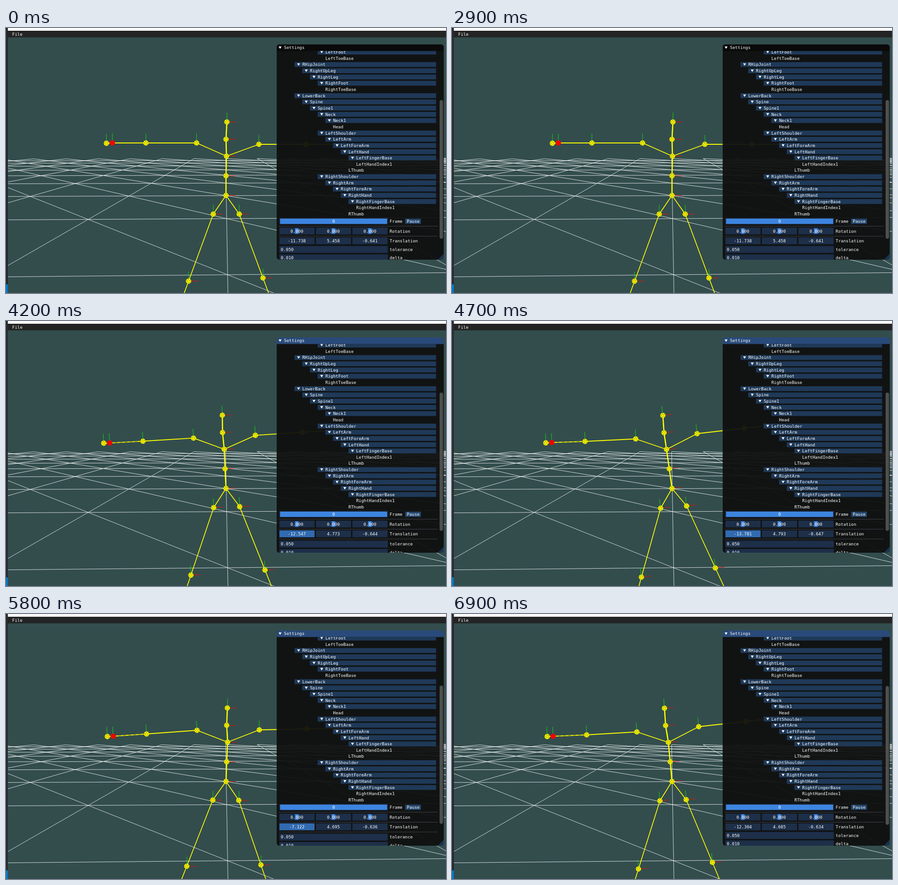
An HTML page with a canvas that plays this animation: 964x581 px, repeating every 7 s.

```html
<!DOCTYPE html>
<html lang="en">
<head>
<meta charset="utf-8">
<title>Skeleton viewer</title>
<style>
  html, body { margin: 0; width: 100%; height: 100%; overflow: hidden; background: #334d4d; }
  canvas, svg { position: absolute; left: 0; top: 0; width: 964px; height: 581px; display: block; }
  text { font: 9.35px "DejaVu Sans Mono", monospace; fill: #fff; white-space: pre; }
  .header { fill: #1f3958; }
  .frame { fill: #1d2f49; }
  .frame.hover { fill: #23456d; }
  .frame.active { fill: #316ab0; }
  .grab { fill: #3d85e0; }
  .rule { fill: #404048; }
  .mid { text-anchor: middle; }
</style>
</head>
<body>
<canvas id="scene" width="964" height="581"></canvas>
<svg id="ui" viewBox="0 0 964 581">
  <defs>
    <clipPath id="window"><rect x="593" y="36" width="366" height="472" rx="6"/></clipPath>
    <clipPath id="content"><rect x="593" y="50.5" width="366" height="457.5"/></clipPath>
  </defs>
</svg>
<script>
const LOOP = 7000, STEP = 100;
const ctx = document.getElementById('scene').getContext('2d');
const ui = document.getElementById('ui');

// ---------- interface ----------
function add(parent, tag, attrs, label) {
  const node = document.createElementNS('http://www.w3.org/2000/svg', tag);
  for (const key in attrs) node.setAttribute(key, attrs[key]);
  if (label !== undefined) node.textContent = label;
  parent.appendChild(node);
  return node;
}
const rect = (parent, x, y, width, height, attrs) =>
  add(parent, 'rect', { x, y, width, height, ...attrs });
const text = (parent, x, midY, label, cls = '') =>
  add(parent, 'text', { x, y: midY + 3.2, class: cls }, label);
const arrow = (parent, x, y) =>
  add(parent, 'path', { d: `M${x - 3.2} ${y - 2.6}h6.4l-3.2 5.4z`, fill: '#fff' });

rect(ui, 0, 0, 964, 6, { fill: '#fff' });
rect(ui, 0, 6, 964, 14.5, { fill: '#242424' });
text(ui, 13.5, 14, 'File');
rect(ui, 0, 0, 4, 581, { fill: '#29292c' });
const edge = rect(ui, 2, 0, 2, 581, { fill: '#252528' });
rect(ui, 0, 562, 4, 19, { fill: '#007acc' });

const win = add(ui, 'g', { 'clip-path': 'url(#window)' });
rect(win, 593, 36, 366, 472, { fill: '#0f0f0f', 'fill-opacity': .94 });
const title = rect(win, 593, 36, 366, 14.5, { fill: '#0a0a0a' });
arrow(win, 600.5, 43);
text(win, 609, 43.2, 'Settings');
const scroll = rect(win, 950, 158, 7.5, 304, { rx: 3.7, fill: '#4f4f4f' });
add(win, 'path', { d: 'M959 495v13h-13z', fill: '#1b3350' });

const body = add(win, 'g', { 'clip-path': 'url(#content)' });
// A leading digit is the depth; a trailing dot marks a leaf.
const TREE = `3LeftFoot 4LeftToeBase. 0RHipJoint 1RightUpLeg 2RightLeg 3RightFoot 4RightToeBase.
  0LowerBack 1Spine 2Spine1 3Neck 4Neck1 5Head. 3LeftShoulder 4LeftArm 5LeftForeArm 6LeftHand
  7LeftFingerBase 8LeftHandIndex1. 7LThumb. 3RightShoulder 4RightArm 5RightForeArm 6RightHand
  7RightFingerBase 8RightHandIndex1. 7RThumb.`;
TREE.split(/\s+/).forEach((entry, i) => {
  const x = 632.2 + entry[0] * 16.88, y = 52.7 + i * 13.65;
  const leaf = entry.endsWith('.'), name = entry.slice(1).replace('.', '');
  if (!leaf) {
    rect(body, x, y - 5.2, 942.3 - x, 10.6, { class: 'header' });
    arrow(body, x + 8.8, y);
  }
  text(body, leaf ? x : x + 17, y + .2, name);
});

const frames = {};
const frame = (id, parent, x, y, w, h) => frames[id] = rect(parent, x, y, w, h, { class: 'frame' });
const rule = (parent, y) => rect(parent, 597.5, y, 348, 1, { class: 'rule' });

frame('slider', body, 599, 416.5, 237.5, 14);
rect(body, 600.5, 418, 234.5, 11.5, { class: 'grab' });
text(body, 717.8, 424, '0', 'mid');
text(body, 840.5, 424, 'Frame');
rect(body, 874.5, 418, 34.5, 11.5, { fill: '#23456d' });
text(body, 878, 424, 'Pause');
rule(body, 434);
rule(body, 456);
text(body, 840.5, 445.5, 'Rotation');
text(body, 840.5, 467, 'Translation');
const readout = [0, 1, 2].map(i => {
  const x = 599 + i * 80, mid = x + 38.2;
  frame('rot' + i, body, x, 437.5, 77, 15.2);
  rect(body, mid - 4, 439, 8, 12.2, { class: 'grab' });
  text(body, mid, 445.5, '0.000', 'mid');
  frame('pos' + i, body, x, 459, 77, 15.2);
  return text(body, mid, 467, '', 'mid');
});
const extraRule = rule(body, 477.5);
const tail = add(body, 'g', {});
[['tolerance', '0.050'], ['delta', '0.010']].forEach(([name, value], i) => {
  const y = 485.5 + i * 18.5;
  frame(name, tail, 599, y - 7.6, 237.5, 15.2);
  text(tail, 602, y, value);
  text(tail, 840.5, y, name);
});

// ---------- motion ----------
// Joints: spine, chest, neck, head, left shoulder, elbow, wrist,
// right shoulder, elbow, left hip, right hip, left knee, right knee.
const rest = [482,324, 483,281, 482,244, 484,206, 417.5,252, 306.5,252, 233,252,
  554,255, 657,255, 454,408, 511,408, 400,555, 563,548];
const dip = rest.slice();
dip.splice(8, 6, 417.5,253, 306.5,256, 233,257.5);
const left = [476,324, 470,281.5, 464.5,245, 462,207, 402.5,258.5, 291.5,264, 218.5,266.5,
  537,247, 640,235, 457,410.5, 514,405.5, 415,561.5, 577,541.5];
const right = [484,324, 487,281, 486,244, 488.5,206, 420.5,254, 310,261, 237.5,267,
  557.5,255.5, 661,257, 453,408, 510,408.5, 395.5,553, 558.5,550];
const back = [483.5,324, 485.5,281, 483.5,244, 485,206, 418.5,255, 308,263, 235,268,
  555,254, 659,252, 453,408, 510,408.5, 396,553, 558.5,550];
const end = [478,324, 474,281.5, 468,244.5, 465.5,206.5, 405,258.5, 295,265, 221.5,268,
  540.5,247, 644,235.5, 455.5,409.5, 513,407, 408.5,559, 570.5,544.5];

const mix = (a, b, w) => a.map((v, i) => v + (b[i] - v) * w);
const KEYS = [
  [3100, [-11.738, 5.458, -.641], rest],
  [3600, [-11.740, 4.275, -.641], dip],
  [3900, [-11.742, 4.760, -.641], back],
  [4600, [-13.620, 4.790, -.647], mix(back, left, 1.12)],
  [4700, [-13.781, 4.793, -.647], left],
  [4800, [-13.650, 4.790, -.647], mix(back, left, 1.28)],
  [5300, [-11.578, 4.746, -.641], right],
  [5800, [-7.122, 4.695, -.636], back],
  [6100, [-13.140, 4.688, -.634], mix(back, left, 1.3)],
  [6200, [-12.304, 4.685, -.634], end],
].map(([time, values, pose]) => [time, [...values, ...pose]]);

function stateAt(t) {
  if (t >= 6900 || t <= KEYS[0][0]) return t >= 6900 ? KEYS[KEYS.length - 1][1] : KEYS[0][1];
  const i = KEYS.findIndex(key => key[0] >= t);
  if (i < 0) return KEYS[KEYS.length - 1][1];
  const [t0, a] = KEYS[i - 1], [t1, b] = KEYS[i];
  return mix(a, b, (t - t0) / (t1 - t0));
}

const POINTER = [
  ['slider', 'hover', 1200, 1300], ['rot1', 'hover', 1300, 1600],
  ['pos1', 'hover', 1700, 1800], ['pos1', 'hover', 2000, 2900], ['pos1', 'hover', 3000, 3200],
  ['pos1', 'active', 3200, 3900], ['pos1', 'hover', 3900, 4000],
  ['pos0', 'hover', 4000, 4100], ['pos0', 'active', 4100, 6200], ['pos0', 'hover', 6200, 6400],
];
const SOLVING = [[3200, 3900], [4100, 5300], [5400, 6200]];

// ---------- scene ----------
function line(x0, y0, x1, y1) {
  ctx.beginPath();
  ctx.moveTo(x0, y0);
  ctx.lineTo(x1, y1);
  ctx.stroke();
}

function ground(col, depth) {
  const z = depth + .0232 * col;
  return [480.5 + (718 * col + 7) / z, 247 + 408.6 / z];
}

function drawGround() {
  ctx.strokeStyle = 'rgba(255,255,255,.8)';
  ctx.lineWidth = 1;
  const near = .9, first = 1.39, far = 10.39;
  for (let row = 0; row < 9; row++)
    line(...ground(-10, first + row), ...ground(10, first + row));
  for (let col = -10; col <= 10; col++)
    line(...ground(col, near), ...ground(col, far));
  for (let sum = -10; sum <= 19; sum++) {
    const lo = Math.max(near, first + sum - 10), hi = Math.min(far, first + sum + 10);
    if (lo < hi) line(...ground(sum - lo + first, lo), ...ground(sum - hi + first, hi));
  }
}

function axes([x, y], angle, withRed) {
  const s = Math.sin(angle), c = Math.cos(angle);
  ctx.lineWidth = 1.1;
  if (withRed) {
    ctx.strokeStyle = '#e3100c';
    line(x, y, x + 21 * c, y + 21 * s);
  }
  ctx.strokeStyle = '#0fd00f';
  line(x, y, x + 20.5 * s, y - 20.5 * c);
}

function ball([x, y], color = '#f5f200') {
  ctx.fillStyle = color;
  ctx.beginPath();
  ctx.arc(x, y, 5.8, 0, 7);
  ctx.fill();
  ctx.strokeStyle = color === '#f00' ? 'rgba(120,0,0,.5)' : 'rgba(45,55,20,.75)';
  ctx.lineWidth = .9;
  for (let i = 0; i < 5; i++) {
    const a = i * 1.257 + .5;
    line(x + 2 * Math.cos(a), y + 2 * Math.sin(a), x + 4.8 * Math.cos(a + .3), y + 4.8 * Math.sin(a + .3));
  }
}

function drawSkeleton(p) {
  const pt = i => [p[2 * i], p[2 * i + 1]];
  const [spine, chest, neck, head, lSh, lEl, lWr, rSh, rEl, lHip, rHip, lKnee, rKnee] =
    Array.from({ length: 13 }, (_, i) => pt(i));
  const hip = [482, 367], finger = [lWr[0] - 13, lWr[1] + .6];
  const beyond = (a, b, k) => [b[0] + (b[0] - a[0]) * k, b[1] + (b[1] - a[1]) * k];
  const slope = (a, b) => Math.atan((b[1] - a[1]) / (b[0] - a[0]));

  const lean = (chest[0] - 483) / 86 * .8;
  for (const joint of [hip, spine, chest, neck, head, lHip, rHip, lKnee, rKnee]) axes(joint, lean, true);
  axes(lSh, slope(lSh, lEl), false);
  axes(lEl, slope(lEl, lWr), false);
  for (const joint of [lWr, finger]) axes(joint, slope(lEl, lWr), false);
  for (const joint of [rSh, rEl]) axes(joint, slope(rSh, rEl), false);

  const bone = (width, ...chain) => {
    ctx.strokeStyle = '#ff0';
    ctx.lineWidth = width;
    for (let i = 1; i < chain.length; i++) line(...chain[i - 1], ...chain[i]);
  };
  bone(2.6, hip, spine, chest, neck, head);
  bone(1.8, finger, lWr, lEl, lSh, chest, rSh, rEl, beyond(rSh, rEl, .7));
  bone(1.7, hip, lHip, lKnee, beyond(lHip, lKnee, .7));
  bone(1.7, hip, rHip, rKnee, beyond(rHip, rKnee, .7));

  if (lWr[1] - lEl[1] > 1) {
    ctx.strokeStyle = 'rgba(40,55,30,.7)';
    ctx.lineWidth = .8;
    ctx.setLineDash([6, 5]);
    line(...lWr, ...lEl);
    ctx.setLineDash([]);
  }
  [hip, spine, chest, neck, head, lSh, lEl, rSh, rEl, lHip, rHip, lKnee, rKnee, finger]
    .forEach(joint => ball(joint));
  ball(lWr, '#f00');
}

// ---------- playback ----------
let shown = -1;
function render(t) {
  const state = stateAt(t);
  ctx.fillStyle = '#334d4d';
  ctx.fillRect(0, 0, 964, 581);
  drawGround();
  drawSkeleton(state.slice(3));

  readout.forEach((node, i) => node.textContent = state[i].toFixed(3));
  for (const id in frames) frames[id].setAttribute('class', 'frame');
  for (const [id, look, from, to] of POINTER)
    if (t >= from && t < to) frames[id].setAttribute('class', 'frame ' + look);

  const solving = SOLVING.some(([from, to]) => t >= from && t < to);
  extraRule.setAttribute('visibility', solving ? 'visible' : 'hidden');
  tail.setAttribute('transform', `translate(0 ${solving ? 3.6 : 0})`);
  scroll.setAttribute('y', solving ? 157 : 158);
  scroll.setAttribute('height', solving ? 303 : 304);
  title.setAttribute('fill', t >= 3200 ? '#294a7a' : '#0a0a0a');
  edge.setAttribute('fill', t >= 800 && t < 6900 ? '#2b2b2e' : '#252528');
}

const start = performance.now();
function tick() {
  const t = Math.floor((performance.now() - start) % LOOP / STEP) * STEP;
  if (t !== shown) render(shown = t);
  requestAnimationFrame(tick);
}
tick();
</script>
</body>
</html>
```
